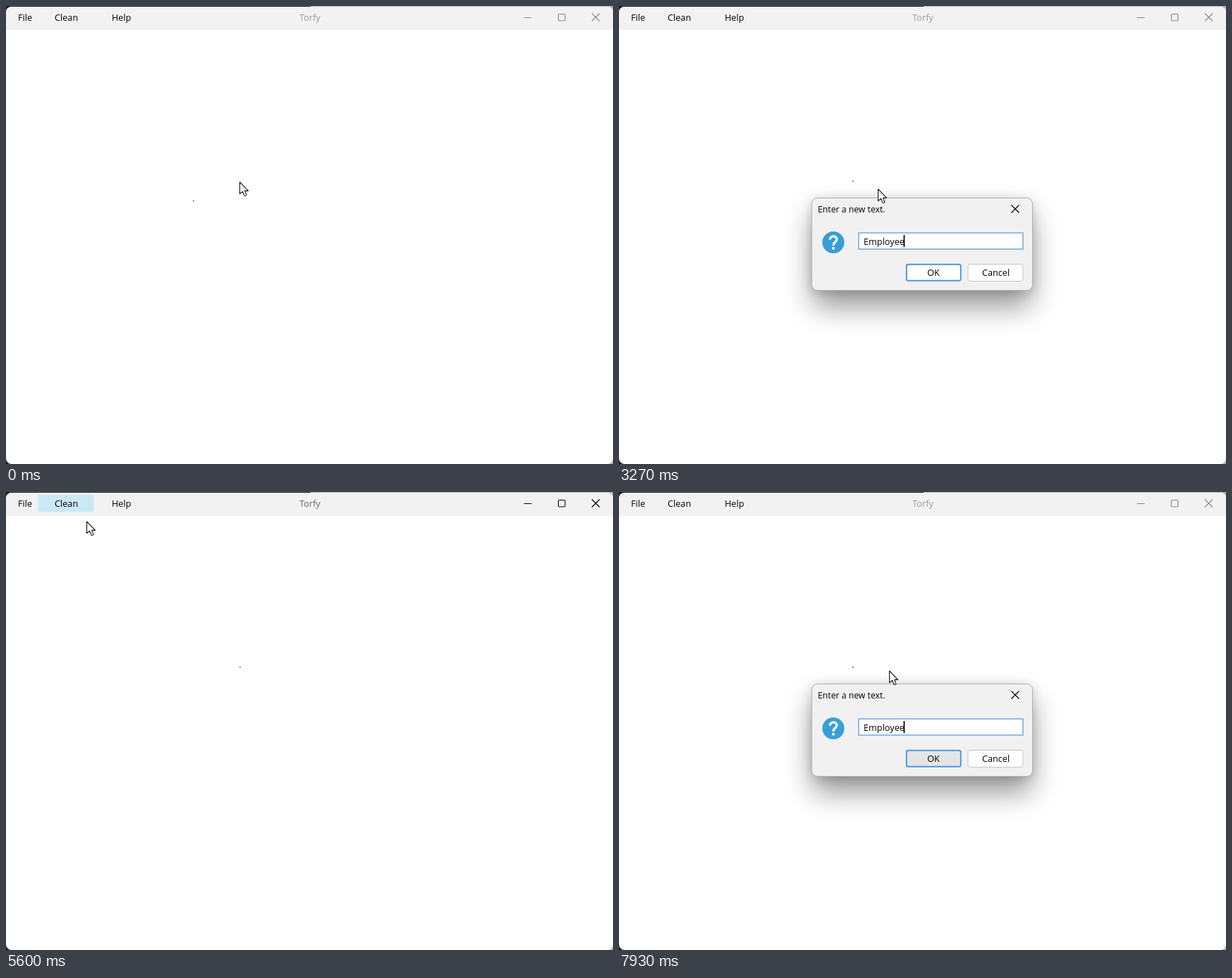
These frames come from a looping animation (861x650 px, 8 s). An HTML page:

```html
<!DOCTYPE html>
<html lang="en">
<head>
<meta charset="utf-8">
<title>Torfy</title>
<style>
  html, body { margin: 0; width: 100%; height: 100%; overflow: hidden; background: #fff; }
  svg { display: block; width: 861px; height: 650px; }
  text { font-family: "Open Sans", "Noto Sans", sans-serif; font-size: 12.7px; white-space: pre; }
  .mid { text-anchor: middle; }
  .line { fill: none; stroke: #000; }
</style>
</head>
<body>
<svg viewBox="0 0 861 650">
  <defs>
    <filter id="soft" x="-50%" y="-100%" width="200%" height="300%"><feGaussianBlur stdDeviation="20"/></filter>
    <filter id="near" x="-30%" y="-50%" width="160%" height="200%"><feGaussianBlur stdDeviation="7"/></filter>
    <clipPath id="frame"><rect y="1" width="861" height="649" rx="8"/></clipPath>
  </defs>

  <!-- window -->
  <rect width="432" height="650" fill="#1c1c1c"/>
  <rect x="432" width="429" height="650" fill="#b4b4b4"/>
  <g clip-path="url(#frame)">
    <rect y="1" width="861" height="649" fill="#fff"/>
    <rect y="1" width="861" height="33" fill="#f2f2f2"/>
  </g>
  <rect id="hover" x="45.5" y="4" width="79" height="24" rx="3"/>
  <text x="17" y="21">File</text>
  <text x="69" y="21">Clean</text>
  <text x="150" y="21">Help</text>
  <text id="title" class="mid" x="431" y="21">Torfy</text>
  <g id="controls" class="line" stroke-width="1.1">
    <path d="M734.5 16.5H745.5M831 10.5L842 21.5M842 10.5L831 21.5"/>
    <rect x="783.5" y="11.5" width="9.5" height="9.5" rx="1.5"/>
  </g>

  <!-- canvas -->
  <rect id="dot" width="1.6" height="1.2" fill="#222"/>
  <g id="node">
    <rect x="292.5" y="229.5" width="80" height="39.5" rx="5" fill="#fff" stroke="#000" stroke-width="1.4"/>
    <text class="mid" x="332.3" y="258" style="font-weight:600;font-size:12.4px">Employee</text>
  </g>

  <g id="menu">
    <rect x="331.5" y="249.5" width="163" height="136" fill="#f7f7f7" stroke="#c4c4c4"/>
    <rect id="pick" x="333" y="252" width="160" height="26" rx="3" fill="#cbe9f5"/>
    <g id="items"></g>
  </g>

  <g id="dialog">
    <rect x="275" y="294" width="310" height="132" rx="8" opacity=".42" filter="url(#soft)"/>
    <rect x="273" y="274" width="314" height="132" rx="8" opacity=".14" filter="url(#near)"/>
    <rect x="273.5" y="272.5" width="313" height="131" rx="8" fill="#f1f1f1" stroke="#b2b2b2"/>
    <text x="282" y="293" style="font-size:12.25px">Enter a new text.</text>
    <path class="line" stroke-width="1.2" d="M556.5 282.5l11 11m0-11l-11 11"/>
    <circle cx="304" cy="335.5" r="15.6" fill="#389fd6"/>
    <path fill="none" stroke="#fff" stroke-width="3.2" d="M299.2 331.5C299.2 325.5 309 325.5 309 331C309 335 304 334.5 304 340"/>
    <circle cx="304" cy="343.8" r="2" fill="#fff"/>
    <rect x="340" y="322" width="233" height="23" fill="#fff" stroke="#83b3e2" stroke-width="1.7"/>
    <text id="input" x="347" y="338.6"></text>
    <rect id="caret" y="325" width="1.7" height="17"/>
    <rect id="ok" x="407.8" y="366.8" width="77" height="23" rx="2.5" stroke="#4d97e0" stroke-width="2"/>
    <text class="mid" x="446" y="383">OK</text>
    <rect x="495" y="366.5" width="78" height="24" rx="2.5" fill="#fff" stroke="#c4c4c4"/>
    <text class="mid" x="534.5" y="383">Cancel</text>
  </g>

  <path id="cursor" fill="#fff" stroke="#111" stroke-width="1.1" stroke-linejoin="round"
    d="M.6.8V17.7L4.5 14.3L7.2 20.4Q8.4 21.4 10 19.5L7.6 13.4H12.6Z"/>
</svg>
<script>
const $ = id => document.getElementById(id);
const LOOP = 8000, TICK = 1000 / 15;
const WORD = "Employee";
// all times below are in ticks of 1/15 s
const KEYS = [[29, 32, 36, 38, 40, 43, 46, 49], [97, 100, 103, 106, 108, 110, 114, 117]];
const MOVES = [
  { at: 13, steps: 3, from: [331, 249], to: [367, 258.5] },
  { at: 64, steps: 9, from: [367, 258.5], to: [83, 16] },
  { at: 84, steps: 5, from: [83, 16], to: [383, 252.5] }
];
// dialog stages: scale and opacity
const OPENING = [[.92, .3], [.943, .82], [.965, .97], [.982, 1], [.994, 1]];
const CLOSING = [[1, 1], [.97, .75], [.945, .4], [.92, .12]];

["Edit text", "Add node", "Add link", "Color", "Delete"].forEach((label, i) => {
  $("items").innerHTML += `<text x="345" y="${269.5 + i * 26.4}">${label}</text>`;
});

const within = (q, a, b) => q >= a && q < b;
const show = (id, on) => $(id).setAttribute("visibility", on ? "visible" : "hidden");
const set = (id, attrs) => { for (const k in attrs) $(id).setAttribute(k, attrs[k]); };

function cursorAt(q) {
  let pos = MOVES[0].from;
  for (const { at, steps, from, to } of MOVES) {
    if (q < at) break;
    const p = Math.min(1, (q - at + 1) / steps);
    const e = p * p * (3 - 2 * p);
    pos = from.map((v, i) => v + (to[i] - v) * e);
  }
  return pos;
}

function dialogAt(q) {
  if (within(q, 53, 57)) return CLOSING[q - 53];
  if (within(q, 21, 53)) return OPENING[q - 21] || [1, 1];
  // the second opening skips its last small stage
  if (q >= 91) return q < 95 ? OPENING[q - 91] : [1, 1];
  return null;
}

function drawDialog(q) {
  const stage = dialogAt(q);
  show("dialog", stage);
  if (!stage) return;
  const [scale, opacity] = stage;
  set("dialog", { opacity, transform: `translate(359.5 312.5) scale(${scale}) translate(-359.5 -312.5)` });
  const typed = KEYS[q < 60 ? 0 : 1].filter(k => q >= k).length;
  $("input").textContent = WORD.slice(0, typed);
  const width = typed ? $("input").getComputedTextLength() : 0;
  set("caret", { x: 346.6 + width * .985 });
  set("ok", { fill: q === 53 || q >= 119 ? "#e5e5e5" : "#fff" });
}

function draw(t) {
  const q = Math.floor((t + 3.4) / TICK) % 120;

  const active = within(q, 9, 21) || within(q, 54, 91);
  set("title", { fill: active ? "#666" : "#999" });
  set("controls", { style: `stroke:${active ? "#000" : "#858585"}` });

  show("hover", within(q, 71, 85));
  set("hover", { fill: within(q, 76, 79) ? "#b5dff0" : "#cbe9f5" });

  const node = within(q, 54, 79);
  show("node", node);
  show("dot", !node);
  set("dot", q < 8 ? { x: 265.2, y: 276 } : { x: 331.2, y: 248 });

  show("menu", within(q, 8, 21));
  set("menu", { opacity: q === 8 ? .5 : 1 });
  show("pick", within(q, 13, 21));

  drawDialog(q);
  set("cursor", { transform: `translate(${cursorAt(q).map(Math.round)})` });
}

const start = performance.now();
function tick() {
  draw((performance.now() - start) % LOOP);
  requestAnimationFrame(tick);
}
tick();
</script>
</body>
</html>
```
